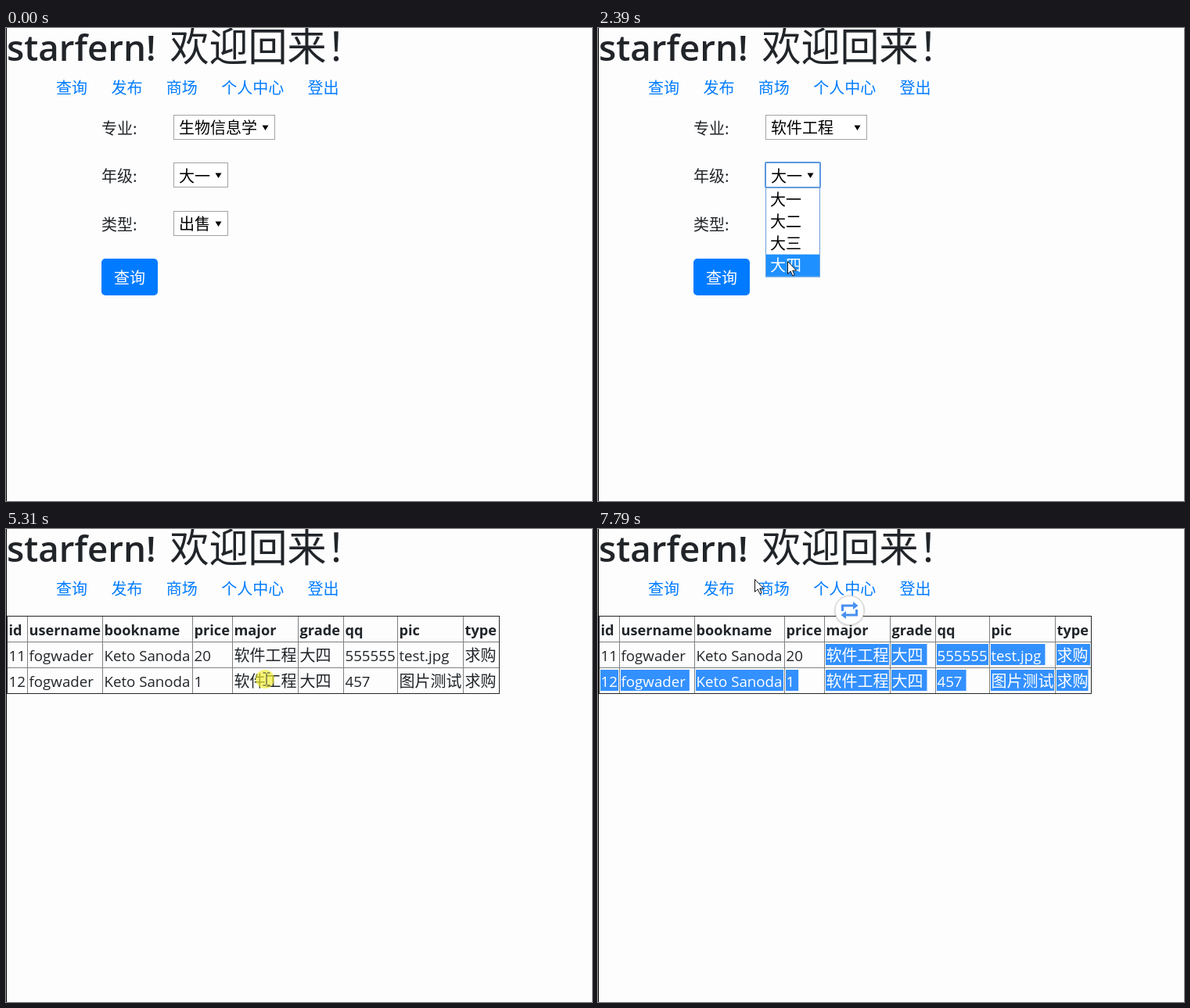
Animation, 749 px wide and 605 px high, one loop 8 s. Source, as an HTML page:

```html
<!DOCTYPE html>
<html lang="zh-CN">
<head>
<meta charset="utf-8">
<title>查询</title>
<style>
html, body { margin: 0; width: 100%; height: 100%; overflow: hidden; background: #fdfdfd; }
svg { display: block; }
text { font: 20px "Noto Sans CJK SC", "Noto Sans CJK", sans-serif; white-space: pre; }
.latin { font: 18.7px "Open Sans", "Noto Sans", sans-serif; }
.bold { font: 700 18.2px "Open Sans", "Noto Sans", sans-serif; }
.name { font: 600 45.7px "Open Sans", "Noto Sans", sans-serif; }
.hello { font-size: 50px; font-weight: 300; }
</style>
</head>
<body>
<svg id="stage" width="749" height="605" viewBox="0 0 749 605"></svg>
<script>
const INK = '#212529', BLUE = '#007bff';
const LOOP = 8000, TICKS = 104;
const SUBMIT = 57, LOADED = 60, DRAG = 86, DROP = 92;
const EM = 20, ITEM = 28.2, LEFT = 214, ROW = 33;

const label = (x, y, s, fill = INK, cls = '') =>
  `<text x="${x}" y="${y}" fill="${fill}" class="${cls}">${s}</text>`;
const rect = (x, y, w, h, attrs) =>
  `<rect x="${x}" y="${y}" width="${w}" height="${h}" ${attrs}/>`;
const within = (k, a, b) => k >= a && k < b;

// Each list opens at tick `open`; its last option is taken at tick `pick`
const selects = [
  { caption: '专业:', options: ['生物信息学', '药学', '软件工程'], open: 8, pick: 21, aim: 268 },
  { caption: '年级:', options: ['大一', '大二', '大三', '大四'], open: 25, pick: 34, aim: 242 },
  { caption: '类型:', options: ['出售', '求购'], open: 39, pick: 47, aim: 254 }
];
selects.forEach((s, i) => {
  s.y = 111 + i * 61.5;
  s.top = Math.floor(s.y);
  s.list = s.top + 32;
  s.w = s.options[0].length * EM + 30;
  s.blur = i < 2 ? selects[i + 1].open : SUBMIT;
});

// Pointer moves: start tick, end tick, x, y; it rests in between
const home = [446, 404];
const moves = [
  ...selects.flatMap((s, i) => [
    [i ? selects[i - 1].pick : 1, s.open - 1, s.aim, s.top + 15],
    [s.open + 2, s.pick - 2, s.aim, s.list + (s.options.length - .5) * ITEM]
  ]),
  [47, 50, 204, 308], [51, 54, 157, 319], [63, 67, 331, 192], [70, 73, 292, 121],
  [74, 84, 623, 195], [DRAG, 89, 331, 170], [89, DROP, 343, 148], [95, 101, 200, 64]
];
const clicks = [...selects.flatMap(s => [s.open, s.pick]), SUBMIT, 69];

const easeOut = f => 1 - (1 - f) ** 2;

function pointer(k) {
  let [x, y] = home;
  for (const [from, to, tx, ty] of moves) {
    if (k <= from) break;
    const f = easeOut(Math.min(1, (k - from) / (to - from)));
    x += (tx - x) * f;
    y += (ty - y) * f;
  }
  return [x, y];
}

function selectBox(s, k) {
  const value = s.options[k >= s.pick ? s.options.length - 1 : 0];
  const ax = LEFT + s.w - 16.5, ay = s.top + 13.5;
  const frame = within(k, s.open, s.blur)
    ? rect(LEFT, s.top, s.w, 32, 'rx="1" fill="#fff" stroke="#5b97e0" stroke-width="2"')
    : rect(LEFT + .5, s.top + .5, s.w - 1, 31, 'fill="#fff" stroke="#a3a3a3"');
  return label(122, s.y + 24.5, s.caption) + frame + label(LEFT + 7, s.y + 24, value, '#000') +
    `<path d="M${ax} ${ay}h8l-4 6.5z"/>`;
}

function dropList(s, y) {
  const n = s.options.length;
  const hot = Math.max(0, Math.min(n - 1, Math.floor((y - s.list - 1) / ITEM)));
  return rect(LEFT + .5, s.list + .5, s.w - 1, n * ITEM + 1, 'fill="#fff" stroke="#6c9fdc"') +
    rect(LEFT + 1, s.list + 1 + hot * ITEM, s.w - 2, ITEM, 'fill="#1e90ff"') +
    s.options.map((o, i) => label(LEFT + 6, s.list + 22.5 + i * ITEM, o, i === hot ? '#fff' : '#000')).join('');
}

function form(k, x, y) {
  const hover = within(x, 122, 194) && within(y, 295, 342);
  const ring = k >= SUBMIT ? rect(120.5, 293.5, 75, 50, 'rx="6.5" fill="none" stroke="#80bdff" stroke-width="3"') : '';
  const open = selects.find(s => within(k, s.open, s.pick));
  return selects.map(s => selectBox(s, k)).join('') + ring +
    rect(122, 295, 72, 47, `rx="5" fill="${hover ? '#0069d9' : BLUE}"`) +
    label(138, 327, '查询', '#fff') + (open ? dropList(open, y) : '');
}

const head = ['id', 'username', 'bookname', 'price', 'major', 'grade', 'qq', 'pic', 'type'];
const rows = [
  ['11', 'fogwader', 'Keto Sanoda', '20', '软件工程', '大四', '555555', 'test.jpg', '求购'],
  ['12', 'fogwader', 'Keto Sanoda', '1', '软件工程', '大四', '457', '图片测试', '求购']
];
const cols = [26, 96, 115, 51, 84, 58, 69, 84, 46].reduce((a, w) => [...a, a[a.length - 1] + w], [1]);

const isCjk = s => s.charCodeAt(0) > 255;
const pen = document.createElement('canvas').getContext('2d');
pen.font = '18.7px "Open Sans", "Noto Sans", sans-serif';
const textWidth = s => isCjk(s) ? s.length * EM : pen.measureText(s).width;

const tableText = fill => rows.map((row, r) => row.map((s, c) =>
  label(cols[c] + 2.5, 169 + r * ROW, s, fill, isCjk(s) ? '' : 'latin')).join('')).join('');

function grid() {
  const inner = cols.slice(1, -1).map(x => `M${x + .5} 112V210`).join('') + 'M2 144.5H630M2 177.5H630';
  return `<path d="${inner}" stroke="#808080"/>` + rect(1.5, 111.5, 629, 99, `fill="none" stroke="${INK}"`);
}

// Everything from the pointer to the end of the table, in reading order
function selection(k) {
  if (k <= DRAG) return '';
  const [x, y] = pointer(Math.min(k, DROP));
  const first = y < 177 ? 0 : 1;
  const col = cols.filter(c => c < x).length - 1;
  const origin = cols[col] + 2;
  const from = y < 160 ? origin : origin + Math.round((x - origin) / EM) * EM;
  let d = '';
  rows.forEach((row, r) => row.forEach((s, c) => {
    if (r < first || r === first && c < col) return;
    const left = r === first && c === col ? from : cols[c] + 2;
    const tail = r === 1 && c === row.length - 1 ? 0 : 5;
    const right = Math.min(cols[c] + 2.5 + textWidth(s) + tail, cols[c + 1] - 1);
    if (right > left) d += `M${left} ${147 + r * ROW}H${right}v27H${left}z`;
  }));
  return `<clipPath id="sel"><path d="${d}"/></clipPath><g clip-path="url(#sel)">` +
    rect(0, 111, 640, 100, 'fill="#3390ff"') + tableText('#fff') + '</g>';
}

const table = k => grid() + head.map((s, c) => label(cols[c] + 2.5, 136, s, INK, 'bold')).join('') +
  tableText(INK) + selection(k);

const swapIcon = () =>
  '<circle cx="321.5" cy="104.5" r="20" fill="#000" opacity=".1"/>' +
  '<circle cx="321.5" cy="104" r="18.5" fill="#fff" stroke="#d4d4d4"/>' +
  '<path d="M312.5 105V98H327M330.5 103V110H316" fill="none" stroke="#4a90f0" stroke-width="3"/>' +
  '<path d="M326 93l6.5 5-6.5 5zM317 105l-6.5 5 6.5 5z" fill="#4a90f0"/>';

function cursor(k, x, y) {
  const down = within(k, DRAG, DROP) || clicks.some(c => within(k, c, c + 2));
  const beam = within(k, LOADED, DROP) && y < 211;
  const shape = beam
    ? '<path d="M-2.5 -8H1M3 -8H6.5M2 -7.5V7.5M-2.5 8H1M3 8H6.5" fill="none" stroke="#333"/>'
    : '<path d="M.5 .5V16.5L4.2 13 6.8 18.8 9.2 17.8 6.7 12.1H11.6Z" fill="#fff" stroke="#111"/>';
  return `<g transform="translate(${x.toFixed(1)} ${y.toFixed(1)})">` +
    (down ? '<circle r="12" fill="#f2ee30" opacity=".68"/>' : '') + shape + '</g>';
}

function header() {
  let x = 64;
  const links = ['查询', '发布', '商场', '个人中心', '登出'].map(s => {
    const link = label(x, 84, s, BLUE);
    x += s.length * EM + 30.4;
    return link;
  });
  return rect(0, 0, 749, 605, 'fill="#fdfdfd"') + rect(0, 0, 1, 605, '') +
    label(1, 41.5, 'starfern!', INK, 'name') + label(209.5, 42, '欢迎回来！', INK, 'hello') + links.join('');
}

const stage = document.getElementById('stage');
const start = performance.now();
let shown = -1;

function render() {
  const t = (performance.now() - start) % LOOP;
  const k = Math.floor(t / LOOP * TICKS + .1);
  if (k !== shown) {
    shown = k;
    const [x, y] = pointer(k);
    stage.innerHTML = header() + (k < LOADED ? form(k, x, y) : table(k)) +
      (k > 96 ? swapIcon() : '') + (k > 0 ? cursor(k, x, y) : '');
  }
  requestAnimationFrame(render);
}
render();
</script>
</body>
</html>
```
